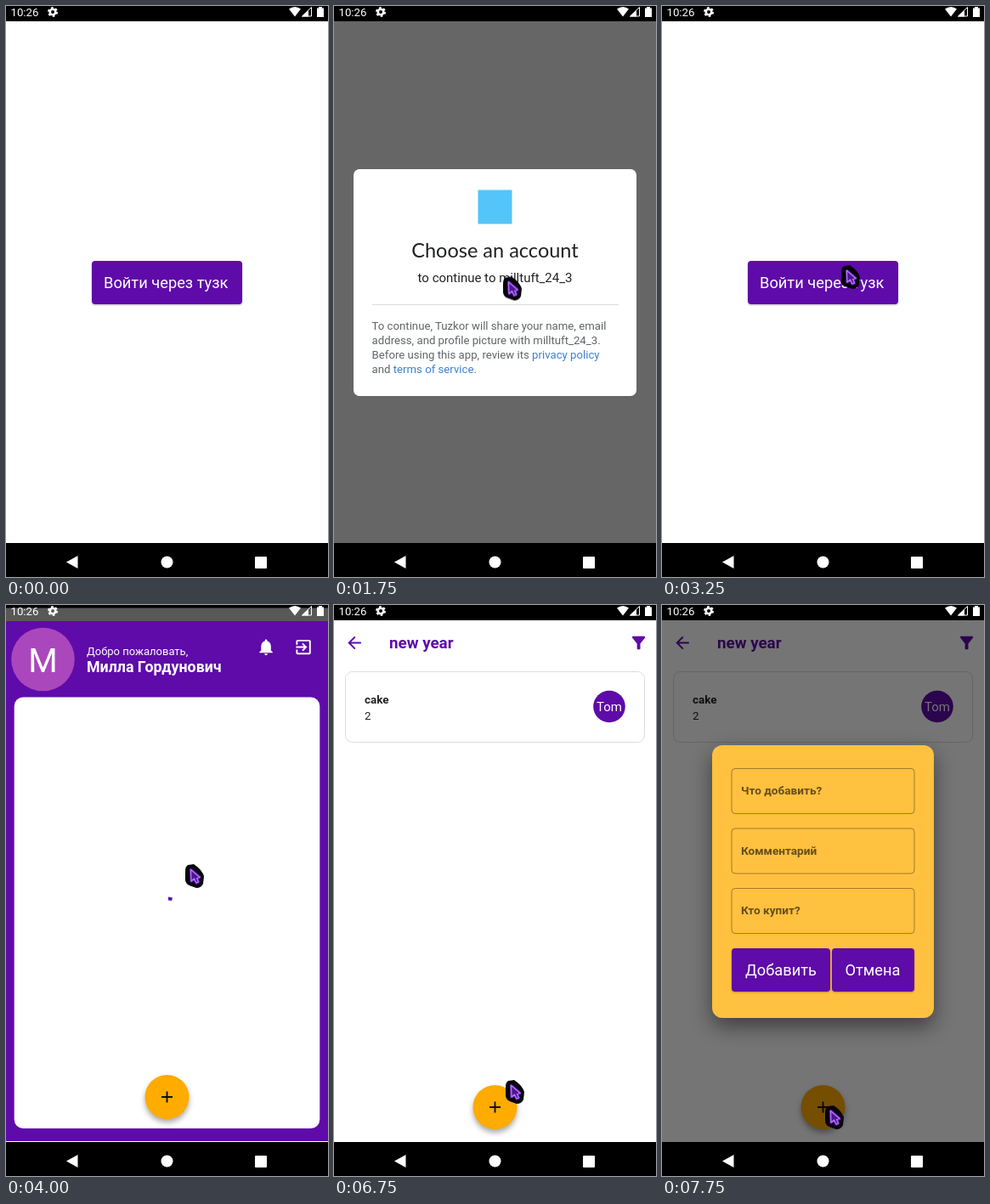
Animation, 379 px wide and 672 px high, one loop 8000 ms. Source, as an HTML page:

```html
<!DOCTYPE html>
<html lang="ru">
<head>
<meta charset="utf-8">
<title>Party planner</title>
<style>
html, body { margin: 0; width: 100%; height: 100%; overflow: hidden; background: #fff; }
svg { display: block; width: 100vw; height: 100vh; }
text { font-family: Roboto, "Noto Sans", sans-serif; font-size: 13.4px; fill: #202124; }
.mid { text-anchor: middle; }
.bold { font-weight: 700; }
.white { fill: #fff; }
.purple { fill: #5e0ba9; }
.label { font-size: 18.3px; fill: #fff; }
.heading { font-size: 18.8px; font-weight: 700; fill: #5e0ba9; }
.title { font-family: Lato, sans-serif; font-size: 23.5px; text-anchor: middle; }
.subtitle { font-size: 15px; text-anchor: middle; }
.terms text, .muted { fill: #606468; font-size: 13.2px; }
.terms .link { fill: #3a80d2; }
.hint { font-weight: 700; font-size: 13.6px; fill: #664d19; }
.field { fill: none; stroke: #a47b28; }
.card { fill: #fff; stroke: #dcdcdc; }
.raised { filter: drop-shadow(0 1px 1px #0004); }
.fab { filter: drop-shadow(0 4px 3px #0005); }
.sheet { filter: drop-shadow(0 10px 12px #0007); }

/* Every change is a hard cut on a 250 ms grid: 3.125% per step. */
.login, .home, .homeCard, .spinner, .list, .listCard, .dim, .consent, .chooser, .rows,
.ripple, .addDialog, .statusTint, .cursor { animation: 8s step-end infinite; }
.login { animation-name: login; }
.home { animation-name: home; }
.homeCard { animation-name: homeCard; }
.spinner { animation-name: spinner; }
.list { animation-name: list; }
.listCard { animation-name: listCard; }
.dim { animation-name: dim; }
.consent { animation-name: consent; }
.chooser { animation-name: chooser; }
.rows { animation-name: rows; }
.ripple { animation-name: ripple; }
.addDialog { animation-name: addDialog; }
.statusTint { animation-name: statusTint; }
.cursor { animation-name: cursor; }

@keyframes login { 0% { opacity: 1 } 50%, 100% { opacity: 0 } }
@keyframes home { 0%, 71.875%, 100% { opacity: 0 } 50% { opacity: 1 } }
@keyframes homeCard { 0% { opacity: 0 } 53.125%, 100% { opacity: 1 } }
@keyframes spinner { 0% { opacity: 1 } 53.125%, 100% { opacity: 0 } }
@keyframes list { 0% { opacity: 0 } 71.875%, 100% { opacity: 1 } }
@keyframes listCard { 0% { opacity: 0 } 75%, 100% { opacity: 1 } }
@keyframes dim {
  0%, 37.5% { opacity: 0 }
  15.625% { opacity: .5 }
  18.75% { opacity: .6 }
  93.75% { opacity: .4 }
  96.875%, 100% { opacity: .54 }
}
@keyframes consent { 0%, 25%, 100% { opacity: 0 } 21.875% { opacity: 1 } }
@keyframes chooser { 0%, 34.375%, 100% { opacity: 0 } 25% { opacity: 1 } }
@keyframes rows { 0% { opacity: .5 } 28.125%, 100% { opacity: 1 } }
@keyframes ripple { 0% { opacity: 0 } 31.25%, 100% { opacity: .08 } }
@keyframes addDialog { 0% { opacity: 0 } 93.75% { opacity: .75 } 96.875%, 100% { opacity: 1 } }
@keyframes statusTint { 0%, 53.125%, 75%, 100% { opacity: 0 } 50%, 71.875% { opacity: 1 } }
@keyframes cursor {
  0% { opacity: 0; transform: translate(249px, 272px) }
  3.125% { opacity: 1; transform: translate(249px, 272px) }
  6.25% { transform: translate(207px, 324px) }
  9.375% { transform: translate(199px, 321px) }
  21.875% { transform: translate(199px, 318.5px) }
  31.25% { transform: translate(211px, 305px) }
  62.5% { transform: translate(217px, 179px) }
  65.625% { transform: translate(245px, 136px) }
  81.25% { transform: translate(211px, 321px) }
  84.375% { transform: translate(202px, 559px) }
  87.5% { transform: translate(193px, 596px) }
  90.625%, 100% { opacity: 1; transform: translate(192px, 589px) }
}
</style>
</head>
<body>
<svg viewBox="0 0 379 672" preserveAspectRatio="none">
  <defs>
    <g id="fab">
      <circle class="fab" r="26" fill="#ffab00"/>
      <path d="M-6.5 0h13M0-6.5v13" stroke="#111" stroke-width="1.9"/>
    </g>
    <g id="intro">
      <rect x="169.5" y="216.5" width="40" height="40" fill="#54c5f8"/>
      <text class="title" x="189.5" y="295.5">Choose an account</text>
      <text class="subtitle" x="189.5" y="324.5">to continue to milltuft_24_3</text>
      <path d="M45 351.5H335" stroke="#dadce0"/>
    </g>
    <g id="terms" class="terms">
      <text x="44.6" y="381">To continue, Tuzkor will share your name, email</text>
      <text x="44.6" y="398">address, and profile picture with milltuft_24_3.</text>
      <text x="44.6" y="415">Before using this app, review its <tspan class="link">privacy policy</tspan></text>
      <text x="44.6" y="432">and <tspan class="link">terms of service</tspan>.</text>
    </g>
    <path id="arrow" d="M6.5 6.5 7 20 10.500 17 13 22 15.500 21 13.500 16.500 17 15.500Z" stroke-linejoin="round"/>
    <clipPath id="firstRow"><rect x="23" y="274" width="333" height="58"/></clipPath>
  </defs>

  <rect width="379" height="672" fill="#fff"/>

  <g class="login">
    <rect class="purple raised" x="101" y="300" width="177" height="51" rx="4"/>
    <text class="label" x="115" y="332">Войти через тузк</text>
  </g>

  <g class="home">
    <rect class="purple" y="18" width="379" height="613"/>
    <circle cx="43.5" cy="64" r="37.3" fill="#ab47bc"/>
    <text class="white mid" x="43.5" y="78.7" style="font-size:39.5px">М</text>
    <text class="white" x="95" y="58.5" style="font-size:13px">Добро пожаловать,</text>
    <text class="white bold" x="95" y="79" style="font-size:17.8px">Милла Гордунович</text>
    <path class="white" transform="translate(294.5 38) scale(.965)" d="M12 22c1.1 0 2-.9 2-2h-4c0 1.1.89 2 2 2zm6-6v-5c0-3.07-1.64-5.64-4.5-6.32V4c0-.83-.67-1.5-1.5-1.5s-1.5.67-1.5 1.5v.68C7.63 5.36 6 7.92 6 11v5l-2 2v1h16v-1l-2-2z"/>
    <path class="white" transform="translate(338.5 38) scale(.965)" d="M10.09 15.59 11.5 17l5-5-5-5-1.41 1.41L12.67 11H3v2h9.67zM19 3H5a2 2 0 0 0-2 2v4h2V5h14v14H5v-4H3v4a2 2 0 0 0 2 2h14a2 2 0 0 0 2-2V5a2 2 0 0 0-2-2z"/>
    <rect class="white" x="9.7" y="108.5" width="359.6" height="507.5" rx="10.5"/>
    <path class="spinner purple" d="M191 343.5l5 1-1 3.5-4-.5z"/>
    <g class="homeCard">
      <rect class="card" x="23.5" y="122.5" width="332" height="64" rx="8"/>
      <text class="bold" x="46" y="159">new year</text>
    </g>
    <use href="#fab" x="189.5" y="579"/>
  </g>

  <g class="list">
    <rect class="white" y="18" width="379" height="614"/>
    <path class="purple" transform="translate(12.5 33) scale(.965)" d="M20 11H7.83l5.59-5.59L12 4l-8 8 8 8 1.41-1.41L7.83 13H20z"/>
    <text class="heading" x="65" y="51">new year</text>
    <path class="purple" transform="translate(347 33) scale(.965)" d="M4.25 5.61 10 13v6q0 1 1 1h2q1 0 1-1v-6l5.74-7.39A1 1 0 0 0 18.95 4H5.04a1 1 0 0 0-.79 1.61z"/>
    <g class="listCard">
      <rect class="card" x="13.5" y="78.5" width="352" height="83" rx="8"/>
      <text class="bold" x="36" y="116">cake</text>
      <text x="36" y="135">2</text>
      <circle class="purple" cx="324" cy="119.5" r="18.8"/>
      <text class="white mid" x="324" y="125" style="font-size:15px">Tom</text>
    </g>
    <use href="#fab" x="189.5" y="591"/>
  </g>

  <rect class="dim" y="18" width="379" height="614"/>

  <g class="consent">
    <rect class="white" x="23" y="192" width="333" height="267" rx="7"/>
    <use href="#intro"/>
    <use href="#terms"/>
  </g>

  <g class="chooser">
    <rect class="white" x="23" y="114" width="333" height="430" rx="7"/>
    <use href="#intro" y="-78"/>
    <g class="rows">
      <circle cx="61" cy="303" r="15" fill="#ab47bc"/>
      <text class="white mid" x="61" y="308.5" style="font-size:16px">М</text>
      <text x="93" y="299">Милла Гордунович</text>
      <text class="muted" x="93" y="316">milla.g@tuftmail.test</text>
      <path d="M45 332.5H335M45 384.5H335M45 436.5H335" stroke="#dadce0"/>
      <g fill="none" stroke="#606468" stroke-width="1.5">
        <circle cx="61" cy="354" r="4"/>
        <path d="M53 367q0-6 8-6t8 6z"/>
      </g>
      <text x="93" y="363">Add another account</text>
    </g>
    <circle class="ripple" cx="207" cy="303" r="100" clip-path="url(#firstRow)"/>
    <use href="#terms" y="85"/>
  </g>

  <g class="addDialog">
    <rect class="sheet" x="59" y="165" width="261" height="321" rx="12" fill="#ffc13f"/>
    <rect class="field" x="82" y="192.5" width="215" height="53" rx="4"/>
    <rect class="field" x="82" y="263" width="215" height="53" rx="4"/>
    <rect class="field" x="82" y="333.5" width="215" height="53" rx="4"/>
    <text class="hint" x="93" y="223">Что добавить?</text>
    <text class="hint" x="93" y="293.5">Комментарий</text>
    <text class="hint" x="93" y="364">Кто купит?</text>
    <rect class="purple raised" x="82" y="404" width="116" height="51" rx="4"/>
    <rect class="purple raised" x="200" y="404" width="97" height="51" rx="4"/>
    <text class="label mid" x="140" y="436">Добавить</text>
    <text class="label mid" x="248" y="436">Отмена</text>
  </g>

  <g class="bars">
    <rect width="379" height="18"/>
    <rect class="statusTint" y="3.5" width="379" height="15.5" fill="#585858"/>
    <text class="white" x="5.5" y="12" style="font-size:13.2px">10:26</text>
    <circle cx="55" cy="7" r="3.3" fill="none" stroke="#fff" stroke-width="2.6"/>
    <circle cx="55" cy="7" r="5.1" fill="none" stroke="#fff" stroke-width="1.8" stroke-dasharray="2.67"/>
    <path class="white" d="M333 3.5q7-5 14 0l-7 9z"/>
    <path d="M348.5 12h11V1.500z" fill="none" stroke="#fff"/>
    <path class="white" d="M348 12.5 356 5v7.500zM366 2.500h2V1h4v1.500h2V13h-8z"/>
    <rect y="632" width="379" height="40"/>
    <path class="white" d="M71 654.5 84.5 647v15z"/>
    <circle class="white" cx="189.5" cy="654.5" r="7"/>
    <rect class="white" x="293" y="648" width="14" height="14" rx="1"/>
  </g>

  <g class="cursor">
    <path d="M3 1Q0 3 0 8V19Q1 24 6 25.500L13 28Q19 28 21 23L22 14Q20 8 14 3L10 0Z" fill="#08000f"/>
    <use href="#arrow" fill="none" stroke="#6a24b8" stroke-width="3"/>
    <use href="#arrow" fill="#4a188c" stroke="#b873ff" stroke-width="1.3"/>
  </g>
</svg>
</body>
</html>
```
